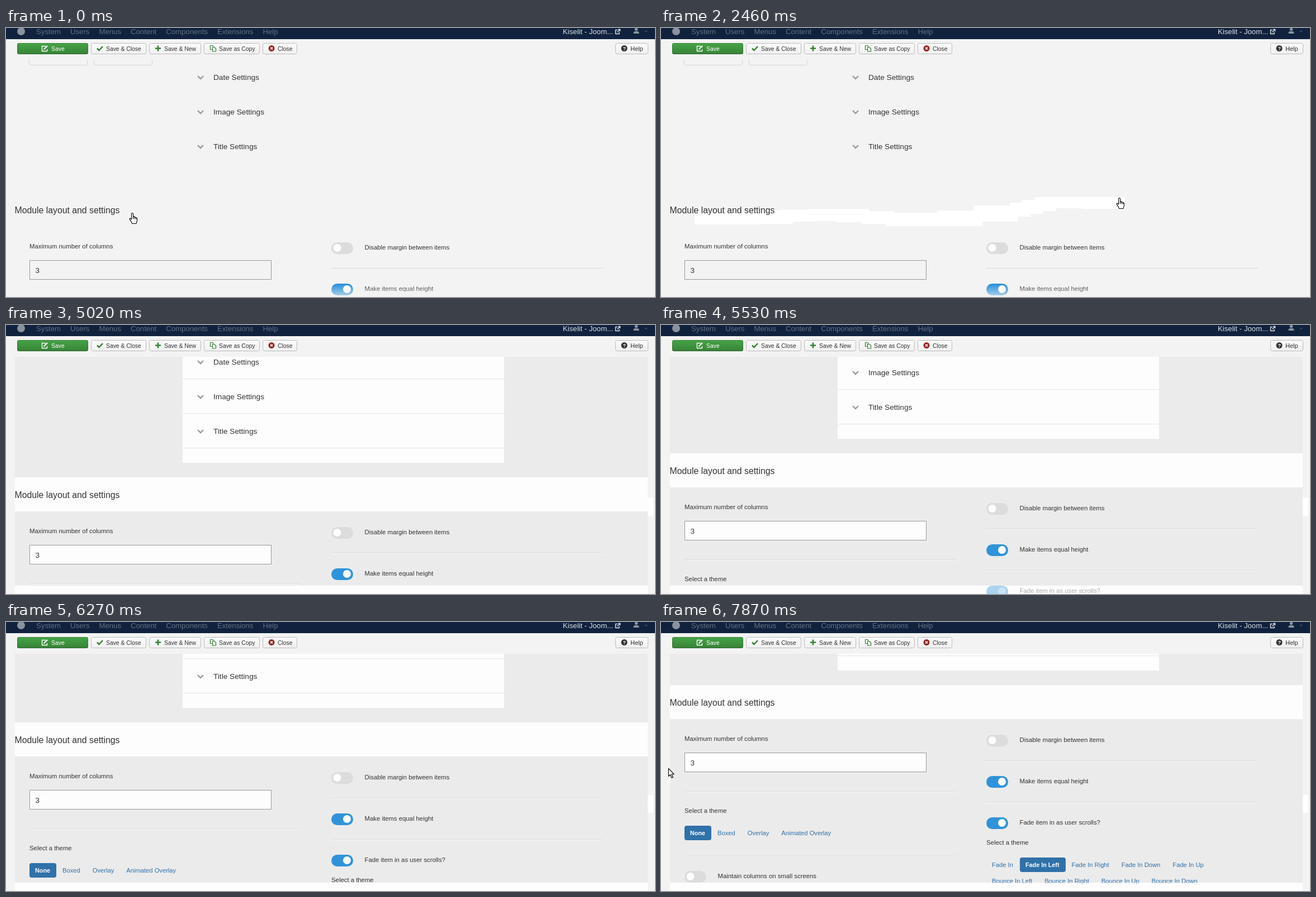
Recreate the animation shown at these times as an HTML page with a canvas. Size 1161 px wide and 482 px high, loop 8 s.

```html
<!DOCTYPE html>
<html>
<head>
<meta charset="utf-8">
<style>
html, body { margin: 0; width: 100%; height: 100%; overflow: hidden; background: #f3f3f3; }
canvas { display: block; }
</style>
</head>
<body>
<canvas id="stage" width="1161" height="482"></canvas>
<script>
const ctx = document.getElementById('stage').getContext('2d');
const LOOP = 8000, SCROLL_START = 4890, HAND_END = 3690, ARROW_START = 7050;
const PAGE = '#f3f3f3', WHITE = '#fdfdfd', GREY = '#ebebeb', INK = '#333', LINK = '#3071a9';
const GREEN = '#378137', PALE = '#dcdfe4', MUTED = '#8b929f';

// Key points: step, then the values reached at that step
const handKeys = [
  [0, 221, 331], [3, 60, 332], [8, 313, 324], [10, 402, 331], [11, 495, 335], [13, 624, 318],
  [16, 691, 303], [20, 939, 304], [22, 905, 320], [25, 980, 310], [26, 1143, 322]
];
const scrollKeys = [[0, 0], [5, 54], [9, 98], [10, 115], [13, 164], [14, 182]];

const handPath = new Path2D('M3.5 12V2a1.5 1.5 0 0 1 3 0V8.5V7.5a1.4 1.4 0 0 1 2.6 0V8.8a1.3 1.3 0 0 1 2.4 0V10a1.1 1.1 0 0 1 2 0V14c0 2-1.5 3-1.5 5.5H4.5C4.5 17 1 14 .2 11.5C-.2 9.5 2 9.5 3.5 12ZM6.5 8v3M9.1 8.5v3M11.5 9.5v2');
const arrowPath = new Path2D('M.5 .5V14.5L3.7 11.5L6.2 17.3L8.5 16.3L6 10.7H10.3Z');

// Number of steps taken so far when one falls every `every` ms from `start`
const stepsTaken = (t, start, every, count) =>
  Math.max(0, Math.min(count, Math.floor((t - start) / every) + 1));

// Linear way through the key points
function along(keys, step) {
  const i = Math.max(1, keys.findIndex(key => key[0] >= step));
  const [from, to] = [keys[i - 1], keys[i]];
  const p = (step - from[0]) / (to[0] - from[0]);
  return from.slice(1).map((v, k) => Math.round(v + (to[k + 1] - v) * p));
}

const handAt = step => along(handKeys, step);

function arrowAt(step) {
  const rest = (1 - (step - 1) / 6) ** 1.5;
  return [13 + 817 * rest, 262 + 95 * rest];
}

function rect(x, y, w, h, color) {
  ctx.fillStyle = color;
  ctx.fillRect(x, y, w, h);
}

function box(x, y, w, h, r, fill, border) {
  ctx.beginPath();
  ctx.roundRect(x, y, w, h, r);
  if (fill) { ctx.fillStyle = fill; ctx.fill(); }
  if (border) { ctx.strokeStyle = border; ctx.lineWidth = 1; ctx.stroke(); }
}

function disc(x, y, r, color) {
  ctx.beginPath();
  ctx.arc(x, y, r, 0, 7);
  ctx.fillStyle = color;
  ctx.fill();
}

function line(d, color, width = 1) {
  ctx.strokeStyle = color;
  ctx.lineWidth = width;
  ctx.stroke(new Path2D(d));
}

// y is the middle of the capitals; returns the width
function text(str, x, y, size, color = INK, weight = '') {
  ctx.font = `${weight} ${size}px "Liberation Sans", Arial, sans-serif`;
  ctx.fillStyle = color;
  ctx.fillText(str, x, y + size * .35);
  return ctx.measureText(str).width;
}

function gradient(y0, y1, from, to) {
  const g = ctx.createLinearGradient(0, y0, 0, y1);
  g.addColorStop(0, from);
  g.addColorStop(1, to);
  return g;
}

function toggle(x, y, on, label) {
  box(x, y - 10, 39, 21, 10.5, on ? '#3093d9' : '#dcdcdc');
  disc(on ? x + 28 : x + 10.5, y, 7, WHITE);
  text(label, x + 59.5, y - .5, 11.35);
}

function divider(x, y, flat) {
  rect(x, y, 486, 1, '#dadada');
  if (!flat) rect(x, y + 1, 486, 1, '#f9f9f9');
}

function tabs(x, y, names, active) {
  for (const name of names) {
    if (name === active) {
      ctx.font = 'bold 10.8px "Liberation Sans", Arial, sans-serif';
      box(x - 10, y - 13, Math.round(ctx.measureText(name).width) + 21, 26, 4, LINK);
      x += text(name, x, y, 10.8, '#fff', 'bold') + 22;
    } else x += text(name, x, y, 11.2, LINK) + 22;
  }
}

function panels() {
  rect(316, 0, 575, 269, WHITE);
  for (let y = 118; y < 269; y += 62) rect(316, y, 575, 1, '#e6e6e6');
  rect(16, 295, 1132, 61, WHITE);
}

function form(flat) {
  if (!flat) panels();
  for (const x of [41.5, 157.5]) box(x, 40.5, 104, 26, 3, null, '#d4d4d4');
  ['Date', 'Image', 'Title'].forEach((name, i) => {
    const y = 88 + i * 62;
    line(`M343 ${y - 2}l5 5l5 -5`, '#999', 2.4);
    text(name + ' Settings', 371, y, 13.65);
  });
  text('Module layout and settings', 15.5, 326, 15.8);

  text('Maximum number of columns', 42, 391, 11.4);
  box(42.5, 416.5, 432, 34, 0, flat ? PAGE : WHITE, '#999');
  text('3', 52.5, 434, 13.5);
  divider(582, 430, flat);
  ['Disable margin between items', 'Make items equal height', 'Fade item in as user scrolls?']
    .forEach((label, i) => { if (!flat || i < 2) toggle(582, 394 + 74 * i, i > 0, label); });
  if (flat) return;

  divider(42, 485);
  text('Select a theme', 42, 520, 11.35);
  tabs(52, 560, ['None', 'Boxed', 'Overlay', 'Animated Overlay'], 'None');
  divider(42, 601);
  toggle(42, 638, false, 'Maintain columns on small screens');

  divider(582, 504);
  text('Select a theme', 582, 577, 11.35);
  tabs(592, 617, ['', ' Left', ' Right', ' Down', ' Up'].map(way => 'Fade In' + way), 'Fade In Left');
  tabs(592, 646, ['Left', 'Right', 'Up', 'Down'].map(way => 'Bounce In ' + way));
}

function clippedForm(top, height, scroll, flat, alpha = 1) {
  ctx.save();
  ctx.beginPath();
  ctx.rect(0, top, 1161, height);
  ctx.clip();
  ctx.translate(0, -scroll);
  ctx.globalAlpha = alpha;
  form(flat);
  ctx.restore();
}

function navbar() {
  rect(0, 0, 1161, 20, '#10223e');
  disc(27, 6, 7, MUTED);
  let x = 54;
  for (const name of ['System', 'Users', 'Menus', 'Content', 'Components', 'Extensions', 'Help'])
    x += text(name, x, 6, 13.2, '#667082') + 17;
  text('Kiselit - Joom...', 996, 6, 13.2, PALE);
  line('M1094 3.5H1090.5V10.5H1097V7.5M1093.5 7.5L1098 3M1095 2.5H1098.5V6', PALE, 1.5);
  disc(1127.5, 2.5, 2.8, MUTED);
  box(1122.5, 6, 10, 4, [3, 3, 0, 0], MUTED);
  ctx.fillStyle = '#3b495f';
  ctx.fill(new Path2D('M1142 5h6l-3 3z'));
}

// Icons are drawn around their own middle
const icons = {
  check() { line('M-5 0l3.5 3.5l6.5 -7', GREEN, 2.5); },
  plus() { line('M-5 0h10M0 -5v10', GREEN, 2.6); },
  copy() { line('M-1 2H-4.5V-5H-.5L1.5 -3M-.5 -2H3L5.5 .5V5.5H-.5Z', GREEN, 1.2); },
  cross() { disc(0, 0, 5.5, '#942a25'); line('M-2 -2l4 4m0 -4l-4 4', '#fff', 1.5); },
  help() { disc(0, 0, 5.5, INK); text('?', -2.5, 0, 9, '#fff', 'bold'); },
  edit() { line('M2 -4H-4.5V5H4.5V1.5', '#fff', 1.4); line('M-1.5 2L5 -4.5', '#fff', 2.2); }
};

function icon(name, x) {
  ctx.save();
  ctx.translate(x, 36.5);
  icons[name]();
  ctx.restore();
}

function button(name, label, x, size = 10.35) {
  ctx.font = `${size}px "Liberation Sans", Arial, sans-serif`;
  const w = Math.round(ctx.measureText(label).width) + 36;
  box(x + .5, 27.5, w - 1, 19, 3, gradient(27, 47, '#fbfbfb', '#f0f0f0'), '#bbb');
  icon(name, x + 16);
  text(label, x + 27, 37, size);
  return w;
}

function toolbar() {
  box(20, 27, 127, 20, 3, gradient(27, 47, '#46a546', GREEN));
  box(20.5, 27.5, 126, 19, 3, null, 'rgba(0,0,0,.2)');
  icon('edit', 69);
  text('Save', 81, 37, 10.4, '#fff');
  let x = 152;
  for (const [name, label] of [['check', 'Save & Close'], ['plus', 'Save & New'],
    ['copy', 'Save as Copy'], ['cross', 'Close']]) x += button(name, label, x) + 5;
  button('help', 'Help', 1090, 11);
}

// Each step wipes the box around the old and the new pointer to white
function smear(at, first, last) {
  for (let step = first; step <= last; step++) {
    const [x0, y0] = at(step - 1), [x1, y1] = at(step);
    rect(Math.min(x0, x1), Math.min(y0, y1), Math.abs(x1 - x0) + 15, Math.abs(y1 - y0) + 20, '#fff');
  }
}

function pointer(path, [x, y]) {
  ctx.save();
  ctx.translate(x, y);
  ctx.fillStyle = '#fff';
  ctx.fill(path);
  ctx.strokeStyle = '#000';
  ctx.lineWidth = 1.1;
  ctx.lineJoin = 'round';
  ctx.stroke(path);
  ctx.restore();
}

function draw(t) {
  const flat = t < SCROLL_START;
  const handStep = stepsTaken(t, 160, 133, 26);
  const arrowStep = stepsTaken(t, ARROW_START, 136, 7);
  const scrollStep = stepsTaken(t, SCROLL_START, 128, 9) + stepsTaken(t, 6270, 126, 5);
  const [scroll] = along(scrollKeys, scrollStep);

  rect(0, 0, 1161, 482, PAGE);
  smear(handAt, 1, handStep);
  smear(arrowAt, 2, arrowStep);
  if (flat) {
    clippedForm(57, 425, scroll, true);
    rect(16, 460, 1132, 22, gradient(460, 482, '#f3f3f300', '#f3f3f3b0'));
  } else {
    rect(16, 57, 1132, 410, GREY);
    rect(16, 467, 1132, 15, WHITE);
    clippedForm(57, 410, scroll, false);
    clippedForm(467, 15, scroll, false, .4);
  }
  navbar();
  toolbar();
  if (t < HAND_END) pointer(handPath, handAt(handStep));
  if (arrowStep) pointer(arrowPath, arrowAt(arrowStep));
}

function frame() {
  draw(performance.now() % LOOP);
  requestAnimationFrame(frame);
}
frame();
</script>
</body>
</html>
```
